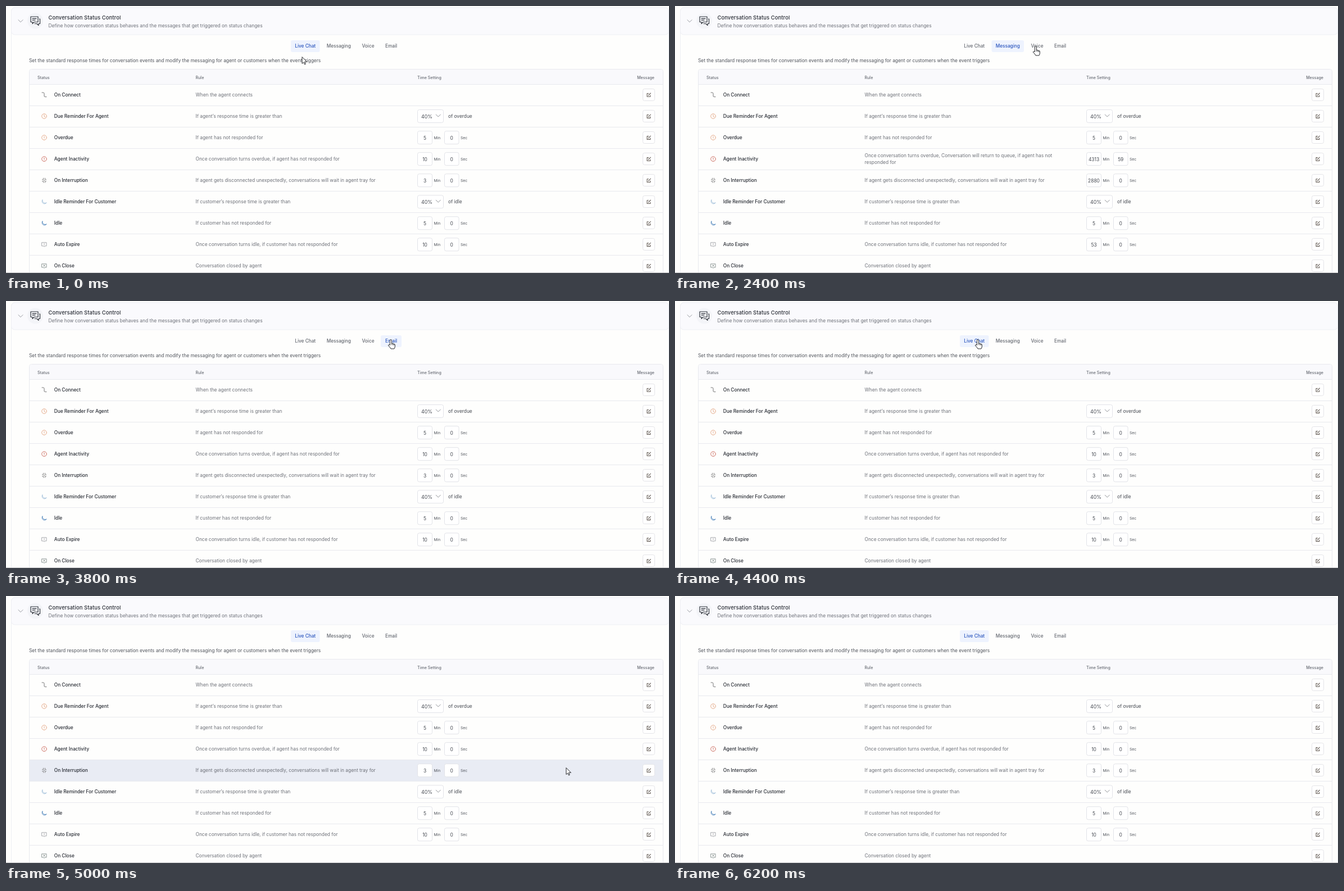
Write an HTML page that moves like this. It is 1180 px wide and 475 px high and loops after 6.4 s.

```html
<!DOCTYPE html>
<html lang="en">
<head>
<meta charset="utf-8">
<title>Conversation status settings</title>
<style>
  html, body { margin: 0; width: 100%; height: 100%; overflow: hidden; background: #fefefd; }
  svg { display: block; width: 1180px; height: 475px; font-family: Inter, "Open Sans", sans-serif; }
  text { white-space: pre; }
</style>
</head>
<body>
<svg viewBox="0 0 1180 475"><g id="page"></g><g id="cursor"></g></svg>
<script>
const LOOP = 6400, STEP = 200, ROW = 38.05, TOP = 139.5;
const INK = '#262a32', GREY = '#6d7078', LINE = '#e8e9ee', PAPER = '#fefefd';
const page = document.getElementById('page'), cursor = document.getElementById('cursor');

// y is the vertical middle of the line
const text = (x, y, s, { size = 8.4, fill = GREY, weight = 400, anchor = 'start', gap = 0 } = {}) =>
  `<text x="${x}" y="${y + size * .36}" font-size="${size}" font-weight="${weight}" fill="${fill}" text-anchor="${anchor}" letter-spacing="${gap}">${s}</text>`;
const rect = (x, y, w, h, fill, stroke = 'none', r = 3) =>
  `<rect x="${x}" y="${y}" width="${w}" height="${h}" rx="${r}" fill="${fill}" stroke="${stroke}"/>`;
const path = (d, stroke, width = .9, fill = 'none') =>
  `<path d="${d}" fill="${fill}" stroke="${stroke}" stroke-width="${width}" stroke-linecap="round" stroke-linejoin="round"/>`;
const at = (x, y, body) => `<g transform="translate(${x} ${y})">${body}</g>`;

const RING = 'M4.3 0A4.3 4.3 0 1 1-4.3 0 4.3 4.3 0 1 1 4.3 0';
const ALERT = RING + 'M0-2V.4M0 2V2.1';
const MOON = 'M-3.2-3.2A4.4 4.4 0 1 0 4.2 1.6 4.8 4.8 0 0 1-3.2-3.2Z';
const BUBBLE = 'M-4-3.6H4V2.6H1.2L0 4-1.2 2.6H-4Z';
const PHONE = 'M-5.5-5.5L-3-6-1.2-2.4-2.8-.9Q-1.5 1.6 1 2.8L2.5 1.2 6 3 5.5 5.6Q4.5 6.4 3 6-4.6 3.6-6-3-6.2-4.8-5.5-5.5Z';
const CHAT = 'M-8-7.5H5V2H-2L-5 5V2H-8ZM-5-4.2H2M-5-1.4H0M7.5-3.5H8.5V5H6V8L3 5H-1';
const EDIT = 'M-.5-2.8H-3V3H2.8V.5M-.8.8L3.3-3.3';

const TABS = [['Live Chat', 507, 51.5], ['Messaging', 563.5, 57.5], ['Voice', 626.5, 36], ['Email', 667, 37]];

// name, rule, [minutes, seconds] or select label, icon path, icon colour
const ROWS = [
  ['On Connect', 'When the agent connects', null, 'M-4-4H-1.8Q0-4 0-2.2V2Q0 3.6 1.8 3.6H4', '#666'],
  ['Due Reminder For Agent', 'If agent’s response time is greater than', 'of overdue', RING + 'M0-2.4V.3L1.8 1.4', '#e3a27e'],
  ['Overdue', 'If agent has not responded for', [5, 0], ALERT, '#e3a27e'],
  ['Agent Inactivity', 'Once conversation turns overdue, if agent has not responded for', [10, 0], ALERT, '#c96456'],
  ['On Interruption', 'If agent gets disconnected unexpectedly, conversations will wait in agent tray for', [3, 0],
    'M-1.4-4V-1.5H-3.5M1.4-4V-1.5H3.5M-1.4 4V1.5H-3.5M1.4 4V1.5H3.5M-.8 0H.8', '#777'],
  ['Idle Reminder For Customer', 'If customer’s response time is greater than', 'of idle', MOON, '#9dbdda'],
  ['Idle', 'If customer has not responded for', [5, 0], MOON, '#4a82ba'],
  ['Auto Expire', 'Once conversation turns idle, if customer has not responded for', [10, 0], BUBBLE + 'M0-2V0M0 1.2V1.3', '#a0a2a6'],
  ['On Close', 'Conversation closed by agent', null, BUBBLE + 'M-1.3-1.8L1.3.8M1.3-1.8L-1.3.8', '#7f8c8a'],
];
const MESSAGING = {
  3: ['Once conversation turns overdue, Conversation will return to queue, if agent has not|responded for', [4313, 59]],
  4: [ROWS[4][1], [2880, 0]],
  7: [ROWS[7][1], [53, 0]],
};

const PANELS = [
  ['Call Recording Control', 'Configure Call Recording Behavior', PHONE, 'Enabled'],
  ['Transfers', 'Settings related to external transfers, skill match and transfer destination control',
    PHONE + 'M1-5.5H6V-2H3.2L2-.8V-2H1Z'],
  ['Skill Modification', 'Allow agents to modify skills attached to an interaction',
    'M-6-5.5H-2.8V-2.3H-6ZM2.8-5.5H6V-2.3H2.8ZM-6 2.3H-2.8V5.5H-6ZM2.8 2.3H6V5.5H2.8ZM-2.8-3.9H2.8M-4.4-2.3V2.3M4.4-2.3V2.3'],
  ['Auto Logout', 'Defines a period of inactivity after which the agent will be logged out.',
    'M4.5-2.5V-5.5H-6V5.5H4.5V2.5M-2.5 0H6.5M4.5-2L6.5 0 4.5 2', 'Disabled'],
];

function panel(y, [title, sub, icon, badge], open) {
  const mid = y + 23.5;
  return rect(9.5, y, 1170, 48, '#fafafd', '#eeeff4', 6)
    + at(26, mid, path(open ? 'M-4-1.8L0 2.2 4-1.8' : 'M-1.8-4L2.2 0-1.8 4', '#8b8d94'))
    + `<circle cx="52" cy="${mid}" r="14" fill="#f3f4f8"/>`
    + at(52, mid, path(icon, '#30343c', open ? 1.2 : 1))
    + text(75.5, y + 18, title, { size: 9.3, weight: 500, fill: INK, gap: .15 })
    + text(75.5, y + 32, sub)
    + (badge ? rect(1130, y + 17, 39, 14, '#f4f4f8', 'none', 7)
      + text(1164, y + 24, badge, { size: 7.1, weight: 500, fill: '#454951', anchor: 'end' }) : '');
}

function field(x, y, w, value, unit) {
  return rect(x + .5, y - 11.5, w, 23, '#fff', '#e2e3e8')
    + text(x + w / 2 + .5, y + .5, value, { fill: '#454951', anchor: 'middle' })
    + text(x + w + 3.5, y, unit, { size: 6.8, fill: '#4f535b' });
}

function setting(y, value) {
  if (!value) return '';
  if (Array.isArray(value)) return field(732, y, 26, value[0], 'Min') + field(780, y, 25.5, value[1], 'Sec');
  return rect(732.5, y - 11.5, 46, 23, '#fff', '#e2e3e8')
    + text(739, y + .5, '40%', { size: 8.8, fill: '#454951' })
    + at(769.3, y - 1, path('M-4-2L0 2 4-2', '#85878d'))
    + text(787, y, value, { fill: '#454951' });
}

function tableRow(i, tab, hover) {
  const [name, baseRule, baseValue, icon, tint] = ROWS[i];
  const [rule, value] = tab === 1 && MESSAGING[i] || [baseRule, baseValue];
  const y = 158 + i * ROW, lines = rule.split('|');
  return (hover ? rect(42, y - 18.5, 1127, ROW, '#e9ecf4', 'none', 0) : '')
    + (i ? path(`M42 ${Math.floor(y - 19) + .5}H1169`, LINE, 1) : '')
    + at(68, y, path(icon, tint))
    + text(85.8, y, name, { size: 8.3, weight: 500, fill: INK })
    + lines.map((s, n) => text(337.5, y + (n - (lines.length - 1) / 2) * 12, s)).join('')
    + setting(y, value)
    + rect(1133.5, Math.round(y) - 10.5, 21, 21, '#fff', '#e4e4e8')
    + at(1144, y + .3, path(EDIT, '#665e57', 1.1));
}

function draw(tab, hover) {
  const voice = tab === 2, bottom = voice ? 178.5 : 490;
  const head = { size: 7.1, weight: 500, fill: '#666a72' };
  let s = rect(9.5, 3, 1170, voice ? 217.5 : 490, PAPER, '#eeeff4', 6)
    + panel(3, ['Conversation Status Control',
      'Define how conversation status behaves and the messages that get triggered on status changes', CHAT], true);
  TABS.forEach(([name, x, w], i) => {
    const on = i === tab;
    if (on) s += rect(x, 61, w, 21, '#eef3fe');
    s += text(x + w / 2, 71.3, name, { size: 8.25, weight: 500, fill: on ? '#2a55bd' : '#646870', anchor: 'middle' });
  });
  s += text(41, 97, 'Set the standard response times for conversation events and modify the messaging for agent or customers when the event triggers', { fill: '#4f535b' })
    + rect(41.5, 114, 1128, bottom - 113, 'none', '#f1f2f5', 4)
    + rect(41.5, 112.5, 1128, bottom - 112.5, PAPER, LINE, 4)
    + '<path d="M42 139V116.5q0-3.5 3.5-3.5H1165.5q3.5 0 3.5 3.5V139Z" fill="#f9f9fc"/>'
    + path('M42 139.5H1169', LINE, 1)
    + text(56, 127, 'Status', head) + text(337.5, 127, 'Rule', head)
    + text(732, 127, 'Time Setting', head) + text(1154, 127, 'Message', { ...head, anchor: 'end' });
  for (let i = 0; i < (voice ? 1 : ROWS.length); i++) s += tableRow(i, tab, i === hover);
  if (voice) {
    s += rect(1072.5, 187.5, 47, 23, '#fff', '#d4d6dc', 4)
      + text(1096.3, 199, 'Cancel', { fill: '#3a3e46', anchor: 'middle' })
      + rect(1129.5, 187.5, 40, 23.5, '#155eef', 'none', 4)
      + text(1149.3, 199, 'Save', { fill: '#fff', weight: 500, anchor: 'middle' });
    PANELS.forEach((p, i) => s += panel(231.5 + i * 58.5, p));
  }
  return s + path('M0 474.5H1180', '#c2c2c4', 1);
}

// time, x, y of the pointer tip
const KEYS = [[0, 527, 91], [1000, 591, 71], [2000, 591, 71], [2400, 642, 72], [3000, 642, 72], [3400, 685, 69],
  [3800, 685, 69], [4200, 539, 69], [4400, 539, 69], [5000, 997, 306], [5200, 1156, 287]];
const ARROW = 'M0 0V11.5L2.7 9 4.6 13 6.3 12.2 4.5 8.3H8.2Z';
const HAND = 'M-1.6 9V1.2a1.5 1.5 0 0 1 3 0V6.5q2-.5 2.2.5 1.8-.4 2 .6 1.7-.2 1.7 1.2V12q0 2-1.4 4H0q-1.5-3-4.8-6 .3-2 3.2-1Z';
const KNUCKLES = 'M1.4 6.5V9M3.6 7V9.3M5.6 7.6V9.6';

function pointer(t) {
  const n = KEYS.findIndex(k => k[0] >= t);
  if (n < 0) return null;
  if (!n) return KEYS[0].slice(1);
  const [t0, x0, y0] = KEYS[n - 1], [t1, x1, y1] = KEYS[n];
  const p = (t - t0) / (t1 - t0), e = p * p * (3 - 2 * p);
  return [x0 + (x1 - x0) * e, y0 + (y1 - y0) * e];
}

let shown = '';
function frame(now) {
  const t = Math.floor(now % LOOP / STEP) * STEP;
  const pos = pointer(t);
  const tab = t < 1800 ? 0 : t < 2600 ? 1 : t < 3600 ? 2 : t < 4200 ? 3 : 0;
  const hover = pos && pos[1] > TOP ? Math.floor((pos[1] - TOP) / ROW) : -1;
  const state = tab + ':' + hover;
  if (state !== shown) {
    page.innerHTML = draw(tab, hover);
    shown = state;
  }
  const overTab = pos && pos[1] < 82 && TABS.some(([, x, w]) => pos[0] >= x && pos[0] <= x + w);
  cursor.innerHTML = pos ? at(...pos, path(overTab ? HAND : ARROW, '#25272b', 1, '#fff')
    + (overTab ? path(KNUCKLES, '#25272b', .8) : '')) : '';
  requestAnimationFrame(frame);
}
requestAnimationFrame(frame);
</script>
</body>
</html>
```
